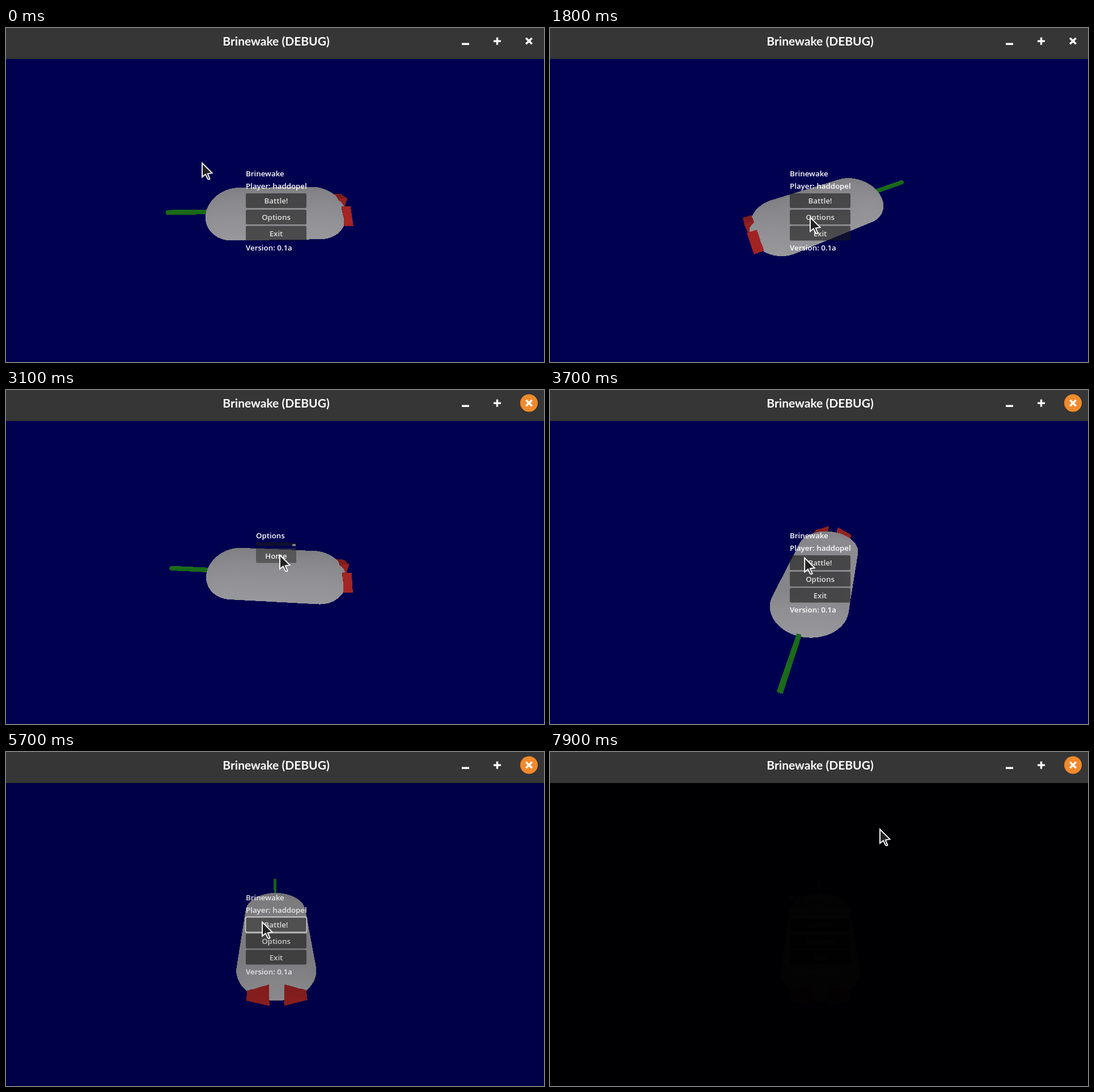
These frames come from a looping animation (949 px wide and 590 px high, 8000 ms). An HTML page with a canvas:

```html
<!DOCTYPE html>
<html lang="en">
<head>
<meta charset="utf-8">
<title>Ship menu</title>
<style>
html, body { margin: 0; width: 100%; height: 100%; overflow: hidden; background: #000; }
canvas { display: block; }
</style>
</head>
<body>
<canvas id="stage" width="949" height="590"></canvas>
<script>
const LOOP = 8000;
const ctx = document.getElementById('stage').getContext('2d');

// Moments at which the picture refreshes
const steps = [];
for (let t = 0; t <= 3500; t += 100) steps.push(t);
steps.push(3700, 3800, 4000, 4200, 4300, 4600, 4800, 4900, 5400,
  5600, 5700, 6400, 6600, 6700, 7600, 7800, 7900);

// Keys: [time, value, ...]
const yawKeys = [[0, 181], [1800, 386.5], [3100, 536.2], [3500, 594], [3800, 628],
  [4000, 650.6], [4300, 679], [4900, 752], [5400, 810.6]];
const fadeKeys = [[5400, 1], [5600, .92], [5700, .9], [6400, .53], [6700, .45],
  [7600, .06], [7900, .02]];
const cursorKeys = [[300, 345, 236], [1500, 458, 332], [2300, 458, 332], [2900, 482, 289],
  [3400, 482, 289], [4200, 375, 305], [4400, 375, 305], [5200, 451, 298],
  [6399, 451, 298], [6400, 581, 134]];

function at(keys, t, ease = k => k) {
  if (t <= keys[0][0]) return keys[0].slice(1);
  for (let i = 1; i < keys.length; i++) {
    const a = keys[i - 1], b = keys[i];
    if (t < b[0]) {
      const k = ease((t - a[0]) / (b[0] - a[0]));
      return a.slice(1).map((v, j) => v + (b[j + 1] - v) * k);
    }
  }
  return keys[keys.length - 1].slice(1);
}
const smooth = k => k * k * (3 - 2 * k);

// ---- 3D ship: ray cast in its own axes (forward, up, side) ----
const VIEW = { x: 262, y: 212, w: 432, h: 346, cx: 476, cy: 323.5, dist: 349 };
const HULL = { f: 51.5, y: 24.6, q: 60, half: 70 / 51.5 };
const buffer = document.createElement('canvas');
buffer.width = VIEW.w;
buffer.height = VIEW.h;
const bctx = buffer.getContext('2d');
const image = bctx.createImageData(VIEW.w, VIEW.h);

function plane(f, y, q, d) {
  const len = Math.hypot(f, y, q);
  return [f / len, y / len, q / len, d / len];
}
const finShade = (ny, nz) => {
  const v = 107 + 42 * ny + 41 * nz;
  return [v, v * .225, v * .22];
};
const mastShade = (ny, nz) => {
  const v = 98 + 10 * ny + 6 * nz;
  return [v * .24, v, v * .24];
};
const hullShade = (ny, nz) => {
  const v = 137 + 14 * nz;
  return [v, v, v + 4];
};

function fin(side) {
  return { shade: finShade, planes: [
    plane(-1, 0, 0, 124.5), plane(1, 0, 0, -110), plane(0, 0, -side, -10),
    plane(0, 30, 15 * side, 30 * 19 + 15 * 10),
    plane(0, -30, 16 * side, 30 * 12 + 16 * 10)
  ] };
}
const mast = { shade: mastShade, planes: [
  plane(1, 0, 0, 191), plane(-1, 0, 0, 0), plane(0, 1, 0, 3),
  plane(0, -1, 0, 3), plane(0, 0, 1, 3), plane(0, 0, -1, 3)
] };
const solids = [fin(1), fin(-1), mast];

function hitSolid(o, d, planes) {
  let near = 0, far = Infinity, normal = null;
  for (const p of planes) {
    const along = p[0] * d[0] + p[1] * d[1] + p[2] * d[2];
    const gap = p[3] - p[0] * o[0] - p[1] * o[1] - p[2] * o[2];
    if (Math.abs(along) < 1e-9) {
      if (gap < 0) return null;
      continue;
    }
    const t = gap / along;
    if (along < 0) {
      if (t > near) { near = t; normal = p; }
    } else if (t < far) far = t;
    if (near > far) return null;
  }
  return normal && { t: near, n: normal };
}

// A capsule stretched along its three axes, shaded with its unstretched normals
function hitHull(o, d) {
  const { f, y, q, half } = HULL;
  const of = o[0] / f, oy = o[1] / y, oq = o[2] / q;
  const df = d[0] / f, dy = d[1] / y, dq = d[2] / q;
  let a = dy * dy + dq * dq, b = oy * dy + oq * dq, c = oy * oy + oq * oq - 1;
  let h = b * b - a * c;
  if (h < 0) return null;
  let t = (-b - Math.sqrt(h)) / a;
  const reach = of + t * df;
  if (Math.abs(reach) > half) {
    const e = of - Math.sign(reach) * half;
    a += df * df;
    b += e * df;
    c += e * e;
    h = b * b - a * c;
    if (h < 0) return null;
    t = (-b - Math.sqrt(h)) / a;
  }
  const pf = of + t * df;
  return { t, n: [pf - Math.max(-half, Math.min(half, pf)), oy + t * dy, oq + t * dq] };
}

function renderShip(yaw) {
  const s = Math.SQRT1_2, D = VIEW.dist;
  const cos = Math.cos(yaw * Math.PI / 180), sin = Math.sin(yaw * Math.PI / 180);
  const local = (x, y, z) => [x * cos - z * sin, y, x * sin + z * cos];
  const o = local(0, D * s, D * s);
  const px = image.data;
  px.fill(0);
  for (let j = 0, k = 0; j < VIEW.h; j++) {
    const v = VIEW.cy - (VIEW.y + j + .5);
    for (let i = 0; i < VIEW.w; i++, k += 4) {
      const u = VIEW.x + i + .5 - VIEW.cx;
      const d = local(u, (v - D) * s, -(v + D) * s);
      let best = hitHull(o, d), shade = hullShade;
      for (const solid of solids) {
        const hit = hitSolid(o, d, solid.planes);
        if (hit && (!best || hit.t < best.t)) {
          best = hit;
          shade = solid.shade;
        }
      }
      if (!best) continue;
      const n = best.n, c = shade(n[1], n[2] * cos - n[0] * sin);
      px[k] = c[0];
      px[k + 1] = c[1];
      px[k + 2] = c[2];
      px[k + 3] = 255;
    }
  }
  bctx.putImageData(image, 0, 0);
}

// ---- Flat parts ----
function rect(x, y, w, h, fill) {
  ctx.fillStyle = fill;
  ctx.fillRect(x, y, w, h);
}
function rounded(x, y, w, h, r) {
  ctx.beginPath();
  ctx.roundRect(x, y, w, h, r);
}
function text(str, x, y, font, fill, align = 'left') {
  ctx.font = font;
  ctx.fillStyle = fill;
  ctx.textAlign = align;
  ctx.fillText(str, x, y);
}
const MENU_FONT = '600 13.3px "Open Sans", sans-serif';
const label = (str, x, y) => text(str, x, y, MENU_FONT, '#fff');

function button(str, x, y, w, hover) {
  rounded(x, y, w, 26, 2.5);
  ctx.fillStyle = hover ? 'rgba(57,57,57,.6)' : 'rgba(26,26,26,.6)';
  ctx.fill();
  text(str, x + w / 2, y + 18, MENU_FONT, hover ? '#f2f2f2' : '#dfdfdf', 'center');
}

function homeMenu(t) {
  label('Brinewake', 423, 262);
  label('Player: haddopel', 423, 284);
  button('Battle!', 423, 292, 107, t >= 5400 && t < 6400);
  button('Options', 423, 321, 107);
  button('Exit', 423, 349.5, 107);
  label('Version: 0.1a', 423, 393);
  if (t >= 5400) {
    rounded(422.5, 291.5, 108, 27, 3);
    ctx.strokeStyle = 'rgba(255,255,255,.75)';
    ctx.lineWidth = 1.8;
    ctx.stroke();
  }
}

function optionsMenu() {
  label('Options', 441, 262);
  rounded(441, 269, 71, 6.5, 3);
  ctx.fillStyle = 'rgba(26,26,26,.6)';
  ctx.fill();
  ctx.beginPath();
  ctx.arc(508, 275.5, 3.4, Math.PI, 0);
  ctx.fillStyle = '#8c8c90';
  ctx.fill();
  button('Home', 441, 279.5, 71, true);
}

function titleBar(active) {
  rect(0, 0, 949, 54, '#363636');
  rect(0, 54, 949, 1, '#2b2b30');
  text('Brinewake (DEBUG)', 476.5, 31, '700 21px Lato, sans-serif', '#fff', 'center');
  rect(804, 26.5, 13, 3.5, '#fff');
  rect(860, 21.5, 13, 3.4, '#fff');
  rect(864.8, 16.7, 3.4, 13, '#fff');
  if (active) {
    ctx.beginPath();
    ctx.arc(922.5, 23, 15.5, 0, 7);
    ctx.fillStyle = '#f08a2c';
    ctx.fill();
  }
  ctx.beginPath();
  ctx.moveTo(917.2, 17.7);
  ctx.lineTo(927.8, 28.3);
  ctx.moveTo(927.8, 17.7);
  ctx.lineTo(917.2, 28.3);
  ctx.strokeStyle = '#fff';
  ctx.lineWidth = 3.6;
  ctx.stroke();
}

const arrow = new Path2D('M1 2.5V27.3L6.8 22.4L10.8 30.4Q12.2 32.3 14.5 30.4L10.7 21.4L18.6 20.2Z');
function cursor(x, y) {
  ctx.save();
  ctx.translate(x, y);
  ctx.fillStyle = '#232323';
  ctx.fill(arrow);
  ctx.strokeStyle = '#fff';
  ctx.lineWidth = 1.9;
  ctx.stroke(arrow);
  ctx.restore();
}

let shownYaw = null;
function draw(t) {
  const [yaw] = at(yawKeys, t);
  if (yaw !== shownYaw) {
    renderShip(yaw);
    shownYaw = yaw;
  }
  rect(0, 55, 949, 535, '#000050');
  ctx.drawImage(buffer, VIEW.x, VIEW.y);
  if (t >= 2000 && t < 3400) optionsMenu();
  else homeMenu(t);
  const [light] = at(fadeKeys, t);
  if (light < 1) rect(0, 55, 949, 535, `rgba(0,0,0,${1 - light})`);
  titleBar(t >= 2000);
  cursor(...at(cursorKeys, t, smooth));
}

let shown = -1;
const start = performance.now();
function tick() {
  const now = (performance.now() - start) % LOOP;
  let t = 0;
  for (const s of steps) if (s <= now) t = s;
  if (t !== shown) {
    draw(t);
    shown = t;
  }
  requestAnimationFrame(tick);
}
tick();
</script>
</body>
</html>
```
